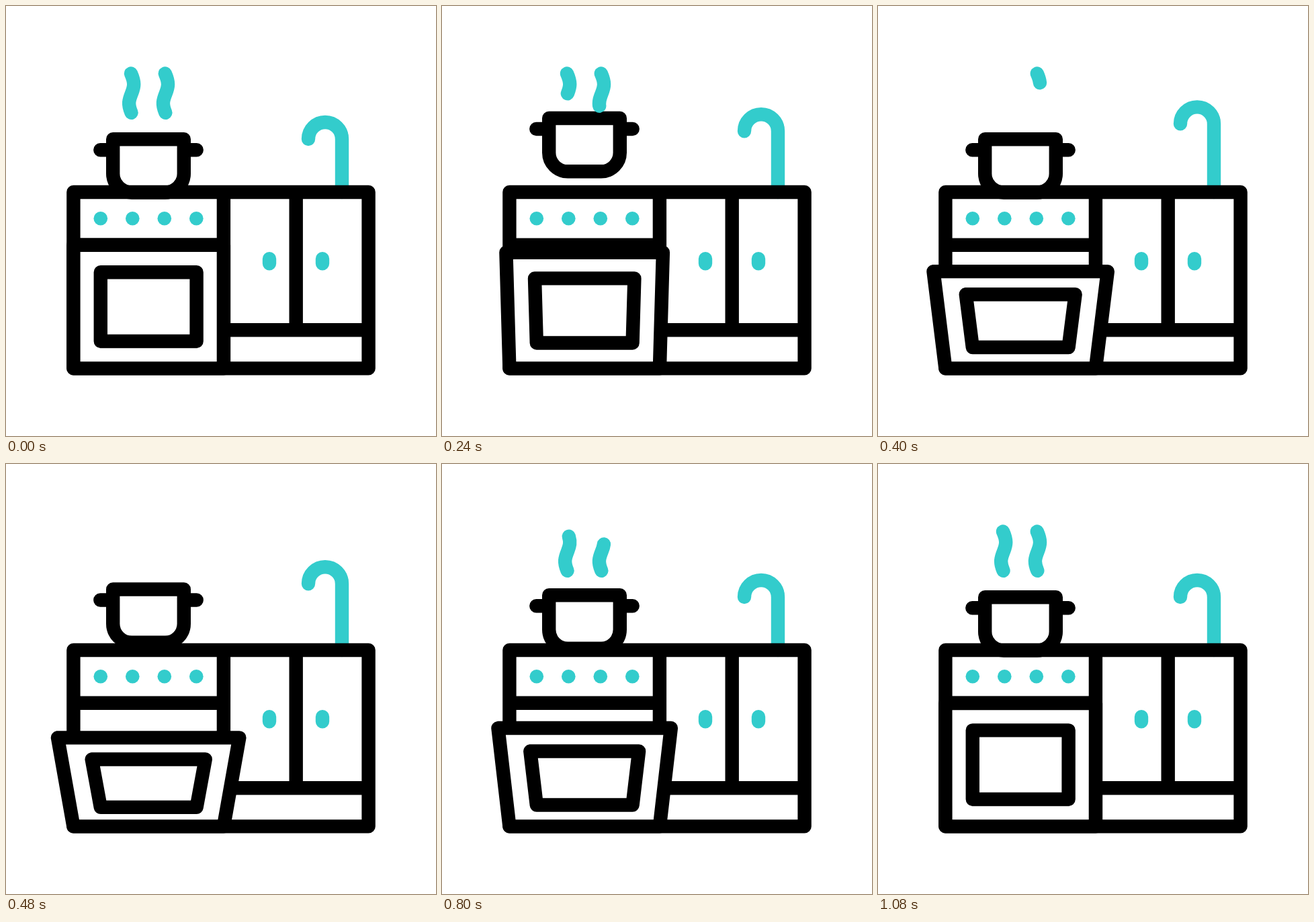
An HTML page that plays this animation: 640x640 px, repeating every 1.52 s.

```html
<!DOCTYPE html>
<html lang="en">
<head>
<meta charset="utf-8">
<title>Kitchen</title>
<style>
  html, body { margin: 0; width: 100%; height: 100%; overflow: hidden; background: #fff; }
  svg { display: block; width: 100%; height: 100%; }
  .line { fill: none; stroke: #000; stroke-width: 20.4; stroke-linecap: round; stroke-linejoin: round; }
  .teal { stroke: #33cccc; }
  .dots { fill: #33cccc; }
  #door { fill: #fff; }
</style>
</head>
<body>
<svg viewBox="0 0 640 640">
  <defs>
    <path id="wisp" pathLength="1" d="M186 100.5C192 114 191 120 187 130S181 146 186.5 158.8"/>
    <circle id="knob" cx="140.8" cy="316.3" r="10.3"/>
  </defs>
  <path id="tap" class="line teal"/>
  <g class="line">
    <path d="M100.4 277H539.6V539.4H100.4Z M323.9 277V539.4 M431.7 277V482.3 M323.9 482.3H539.6 M100.4 355.8H323.9"/>
    <path id="pot" d="M159.2 198.2H264.8V249.5A28 28 0 0 1 236.8 277.5H187.2A28 28 0 0 1 159.2 249.5Z M140.3 214.2H159 M265 214.2H283.7"/>
  </g>
  <g class="dots">
    <use href="#knob"/>
    <use href="#knob" x="47.5"/>
    <use href="#knob" x="95"/>
    <use href="#knob" x="142.5"/>
  </g>
  <path class="line teal" d="M392 376.2V383.2 M471 376.2V383.2"/>
  <path id="door" class="line"/>
  <path id="pane" class="line"/>
  <g class="line teal">
    <use id="leftSteam" href="#wisp"/>
    <use id="rightSteam" href="#wisp" x="50.8"/>
  </g>
</svg>
<script>
const LOOP = 1520, STEP = 40;
const $ = id => document.getElementById(id);

// Progress from 0 to 1 between two times, eased at both ends.
function ease(t, from, to) {
  const x = Math.min(1, Math.max(0, (t - from) / (to - from)));
  return x * x * (3 - 2 * x);
}

// Trapezoid with a level top and bottom.
const trapezoid = (left, right, spread, top, bottom) =>
  `M${left - spread} ${top}H${right + spread}L${right} ${bottom}H${left}Z`;

function drawDoor(t) {
  const drop = 58 * (ease(t, 110, 577) - ease(t, 600, 1095));
  $('door').setAttribute('d', trapezoid(100.4, 323.9, .455 * drop, 355.8 + drop, 539.4));
  $('pane').setAttribute('d', trapezoid(140.8, 283.6, .255 * drop, 396.2 + .84 * drop, 499 + .23 * drop));
}

function drawTap(t) {
  const y = 198 - 22.6 * (ease(t, 70, 400) - ease(t, 400, 765));
  $('tap').setAttribute('d', `M450 ${y}A25 25 0 0 1 500 ${y}V277`);
}

// Three hops along parabolas, each lower than the one before.
function drawPot(t) {
  const hops = Math.max(0, (t - 80) / 320);
  const n = Math.floor(hops), x = hops - n;
  const height = n < 3 ? 31.2 / 2 ** (n * (n + 1) / 2) : 0;
  $('pot').setAttribute('transform', `translate(0 ${-height * 4 * x * (1 - x)})`);
}

// A wisp is wiped away from below, then grows again from below.
function drawSteam(id, t, wipeFrom, wipeTo, growFrom, growTo) {
  const wiping = t < 480;
  const length = wiping ? 1 - ease(t, wipeFrom, wipeTo)
    : t > 480 ? ease(t, growFrom, growTo) : 0;
  const style = $(id).style;
  style.visibility = length > .002 ? 'visible' : 'hidden';
  style.strokeDasharray = length < 1 ? `${length} 2` : 'none';
  style.strokeDashoffset = wiping ? 0 : length - 1;
}

function draw(t) {
  drawDoor(t);
  drawTap(t);
  drawPot(t);
  drawSteam('leftSteam', t, 80, 405, 420, 908);
  drawSteam('rightSteam', t, 140, 520, 549, 954);
}

const began = performance.now();
function tick() {
  const t = (performance.now() - began) % LOOP;
  draw(Math.floor(t / STEP) * STEP);
  requestAnimationFrame(tick);
}
tick();
</script>
</body>
</html>
```
